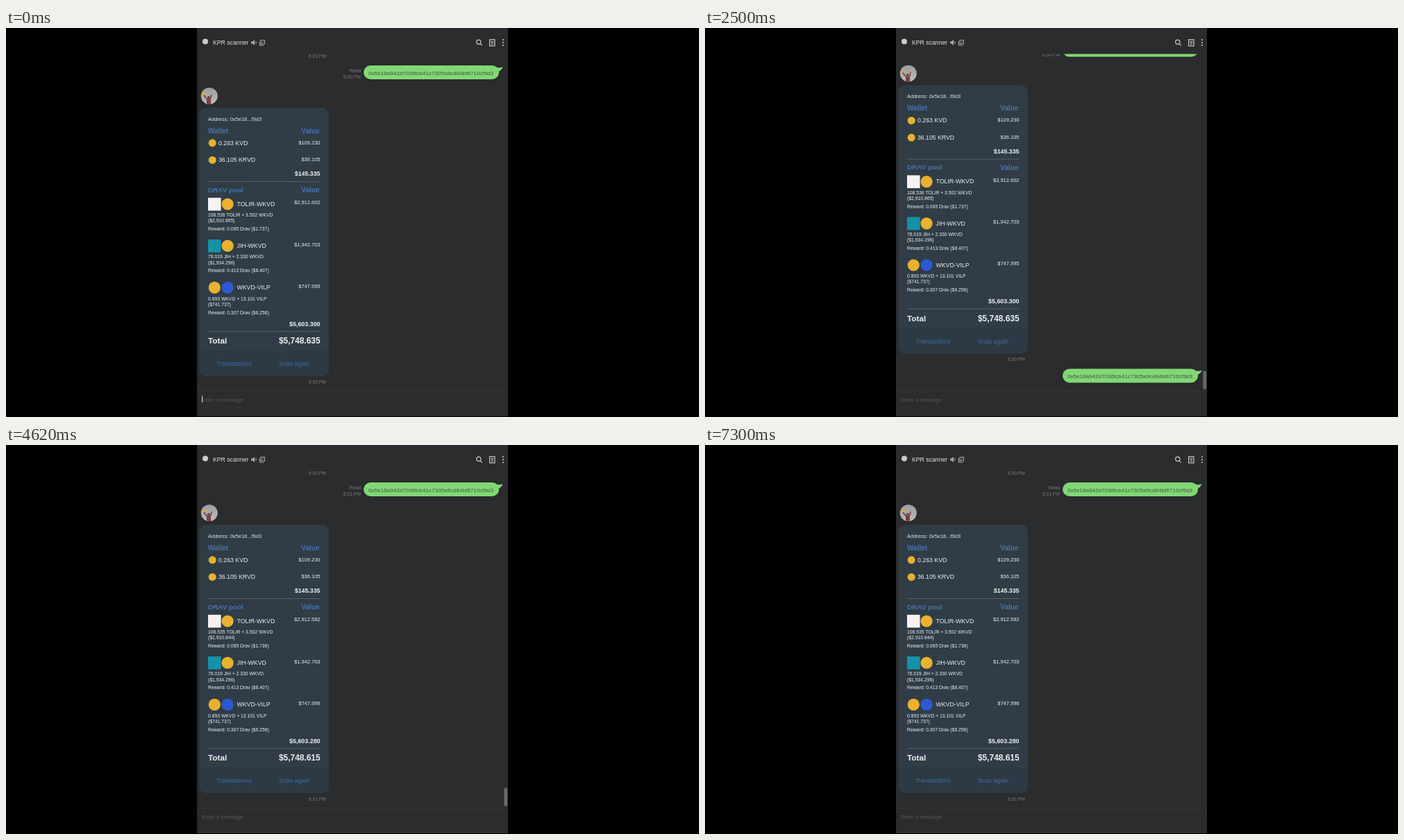
An HTML page with a canvas that plays this animation: 998 px wide and 561 px high, repeating every 7320 ms.

```html
<!DOCTYPE html>
<html lang="en">
<head>
<meta charset="utf-8">
<title>Wallet scan chat</title>
<style>
html, body { margin: 0; width: 100%; height: 100%; overflow: hidden; background: #000; }
canvas { display: block; width: 998px; height: 561px; }
</style>
</head>
<body>
<canvas id="stage"></canvas>
<script>
const W = 998, H = 561, LOOP = 7320;
const PASTE = 1200, SEND = 2400, READ = 2800, REPLY = 4300;
const FONT = '"Liberation Sans", Arial, sans-serif';
const KEY = '0x5e18a942d7036fcb41c7305a9cd84bf6710cf9d3';
const BG = '#2b2c2d', WHITE = '#eceff1', BLUE = '#4672ae', GREY = '#77797b', GREEN = '#82d775', GOLD = '#e9b12f';

const canvas = document.getElementById('stage');
const ctx = canvas.getContext('2d');
const ratio = window.devicePixelRatio || 1;
canvas.width = Math.round(W * ratio);
canvas.height = Math.round(H * ratio);

const between = (t, a, b) => t >= a && t < b;

// y is the middle of the capital letters
function text(str, x, y, size, color = WHITE, { bold = false, right = false } = {}) {
  ctx.font = (bold ? 'bold ' : '') + size + 'px ' + FONT;
  ctx.textAlign = right ? 'right' : 'left';
  ctx.fillStyle = color;
  ctx.fillText(str, x, y + size * 0.36);
}

function rect(x, y, w, h, color) {
  ctx.fillStyle = color;
  ctx.fillRect(x, y, w, h);
}

function rounded(x, y, w, h, r, color) {
  ctx.beginPath();
  ctx.roundRect(x, y, w, h, r);
  ctx.fillStyle = color;
  ctx.fill();
}

function disc(x, y, r, color) {
  ctx.beginPath();
  ctx.arc(x, y, r, 0, Math.PI * 2);
  ctx.fillStyle = color;
  ctx.fill();
}

function stroke(points, color, width = 1) {
  ctx.beginPath();
  points.forEach(([x, y], i) => i ? ctx.lineTo(x, y) : ctx.moveTo(x, y));
  ctx.strokeStyle = color;
  ctx.lineWidth = width;
  ctx.stroke();
}

function header() {
  const ink = '#c9cbcc';
  disc(287, 19.5, 4, ink);
  text('KPR scanner', 298, 21, 8.7, '#e2e3e4');

  // speaker
  ctx.beginPath();
  [[353, 19.5], [355, 19.5], [358, 17], [358, 25], [355, 22.5], [353, 22.5]].forEach(p => ctx.lineTo(...p));
  ctx.fillStyle = '#a9abac';
  ctx.fill();
  stroke([[359.6, 19], [360.3, 21], [359.6, 23]], '#a9abac');

  // detach window
  ctx.strokeStyle = '#a9abac';
  ctx.lineWidth = 1;
  ctx.strokeRect(367, 17.5, 5.5, 5.5);
  stroke([[365.2, 19], [365.2, 25], [371, 25]], '#a9abac');
  stroke([[368.5, 21.5], [371, 19]], '#a9abac');

  // search, notes, menu
  ctx.beginPath();
  ctx.arc(680.7, 20.3, 3.1, 0, Math.PI * 2);
  ctx.strokeStyle = ink;
  ctx.lineWidth = 1.2;
  ctx.stroke();
  stroke([[683, 22.6], [685.8, 25.4]], ink, 1.2);
  ctx.strokeRect(696.5, 16.8, 7.4, 9);
  stroke([[698.3, 19.5], [702.1, 19.5]], ink);
  stroke([[698.3, 21.5], [702.1, 21.5]], ink);
  stroke([[699, 23.5], [701.4, 23.5]], ink);
  for (const y of [17, 21, 25]) disc(715.8, y, 1.1, ink);
}

function bubble(top, time) {
  rounded(515, top, 195, 20, 10, GREEN);
  ctx.beginPath();
  ctx.moveTo(703, top + 1);
  ctx.quadraticCurveTo(709, top + 5, 715.3, top + 2);
  ctx.quadraticCurveTo(714, top + 7, 709, top + 9);
  ctx.fillStyle = GREEN;
  ctx.fill();
  text(KEY, 522, top + 11, 8.1, '#365b38');
  if (time) {
    text('Read', 511, top + 8, 6.8, GREY, { right: true });
    text(time, 511, top + 17, 6.8, GREY, { right: true });
  }
}

function avatar() {
  ctx.save();
  ctx.beginPath();
  ctx.arc(292.8, 98, 12, 0, Math.PI * 2);
  ctx.clip();
  const sky = ctx.createLinearGradient(0, 86, 0, 110);
  sky.addColorStop(0, '#9b9da1');
  sky.addColorStop(1, '#c0bab8');
  rect(280, 86, 26, 24, sky);
  disc(285, 95, 2.6, '#d7a64a');
  stroke([[285, 97], [288, 101], [291, 104]], '#69464a', 1.8);
  stroke([[296, 96], [295, 101], [292, 104]], '#8a4144', 1.8);
  disc(291.8, 100, 1.9, '#554448');
  rounded(289, 102, 6, 9, 2, '#7c3d43');
  ctx.restore();
}

function divider(y) {
  rect(291, y, 161.5, 0.8, '#5d6970');
}

function pool(y, row, icons) {
  icons.forEach(([color, square], i) => {
    const x = 300.3 + i * 18.8;
    if (square) rect(x - 9.3, y - 9.2, 18.6, 18.6, color);
    else disc(x, y, 8.6, color);
  });
  text(row.pair, 332.5, y - 0.4, 8.75);
  text(row.value, 452.5, y - 2.3, 7.5, WHITE, { right: true });
  text(row.parts, 291, y + 15.8, 6.8);
  text(row.worth, 291, y + 23.9, 6.8);
  text('Reward: ' + row.reward, 291, y + 35.8, 6.8);
}

function card(fresh) {
  const end = { right: true }, strong = { bold: true }, sum = { bold: true, right: true };
  const fill = ctx.createLinearGradient(278, 115, 465, 465);
  fill.addColorStop(0, '#303c45');
  fill.addColorStop(1, '#303d48');
  rounded(278.5, 115, 186.5, 387, 10, fill);
  rounded(278.5, 465, 186.5, 37, [0, 0, 10, 10], '#2c3a45');

  text('Address: 0x5e18...f9d3', 291, 131, 7.5, '#dfe3e6');
  text('Wallet', 291, 148, 10, BLUE, strong);
  text('Value', 451.5, 148, 10, BLUE, sum);
  disc(297.2, 165.8, 5.5, GOLD);
  text('0.263 KVD', 306, 165.7, 8.75);
  text('$109.230', 452.5, 164.8, 7.5, WHITE, end);
  disc(297.2, 190.4, 5.5, GOLD);
  text('36.105 KRVD', 306, 190.3, 8.7);
  text('$36.105', 452.5, 189.4, 7.5, WHITE, end);
  text('$145.335', 452.5, 210.2, 8.8, WHITE, sum);
  divider(221.2);

  text('DRAV pool', 291, 233.3, 9.9, BLUE, strong);
  text('Value', 451.5, 233.3, 10, BLUE, sum);
  pool(254, {
    pair: 'TOLIR-WKVD',
    value: fresh ? '$2,912.582' : '$2,912.602',
    parts: (fresh ? '108.535' : '108.536') + ' TOLIR + 3.502 WKVD',
    worth: fresh ? '($2,910.844)' : '($2,910.865)',
    reward: '0.085 Drav ' + (fresh ? '($1.738)' : '($1.737)')
  }, [['#f8f1f1', true], [GOLD]]);
  pool(314.2, {
    pair: 'JIH-WKVD',
    value: '$1,942.703',
    parts: '78.019 JIH + 2.330 WKVD',
    worth: '($1,934.296)',
    reward: '0.413 Drav ($8.407)'
  }, [['#1591a8', true], [GOLD]]);
  pool(374.4, {
    pair: 'WKVD-VILP',
    value: fresh ? '$747.996' : '$747.995',
    parts: '0.893 WKVD + 13.101 VILP',
    worth: '($741.737)',
    reward: '0.307 Drav ($6.258)'
  }, [[GOLD], ['#2c59d2']]);
  text(fresh ? '$5,603.280' : '$5,603.300', 452.5, 426.3, 8.9, WHITE, sum);
  divider(437);

  text('Total', 291, 450.8, 11.8, WHITE, strong);
  text(fresh ? '$5,748.615' : '$5,748.635', 452.5, 450.8, 11.9, WHITE, sum);
  text('Transactions', 303, 484, 8.85, '#3f69a0');
  text('Scan again', 393, 484, 8.85, '#3f69a0');
}

function thread(t) {
  const fresh = t >= REPLY;
  const pending = between(t, SEND, REPLY);
  const now = fresh ? '6:31 PM' : '6:30 PM';
  const stamp = (str, y) => text(str, 461, y, 6.8, GREY, { right: true });

  ctx.save();
  ctx.beginPath();
  ctx.rect(275, 37.5, 448, 486);
  ctx.clip();
  ctx.translate(0, pending ? -32.4 : 0);
  stamp(fresh ? '6:30 PM' : '6:29 PM', 41);
  bubble(54, now);
  avatar();
  card(fresh);
  stamp(now, 510.3);
  if (pending) bubble(523.9, t >= READ ? '6:31 PM' : '');
  ctx.restore();

  if (between(t, SEND, 3600) || between(t, REPLY, 6400)) {
    rounded(717.3, 494.5, 4.7, 26.5, 2, '#68696a');
  }
}

function composer(t) {
  rect(275, 523.5, 448, 0.8, '#38393a');
  if (between(t, PASTE, SEND)) text(KEY, 282, 535.2, 8.2);
  else text('Enter a message', 282, 536.2, 7.85, '#565859');
  if (t < 400 || between(t, 2800, 4240) || between(t, 5680, 7120)) {
    rect(282, 530.5, 1, 9.5, '#e4e4e4');
  }
}

function draw(t) {
  ctx.setTransform(ratio, 0, 0, ratio, 0, 0);
  rect(0, 0, W, H, '#000');
  rect(275, 0, 448, 560, BG);
  thread(t);
  header();
  composer(t);
}

const start = performance.now();
function tick() {
  draw((performance.now() - start) % LOOP);
  requestAnimationFrame(tick);
}
tick();
</script>
</body>
</html>
```
